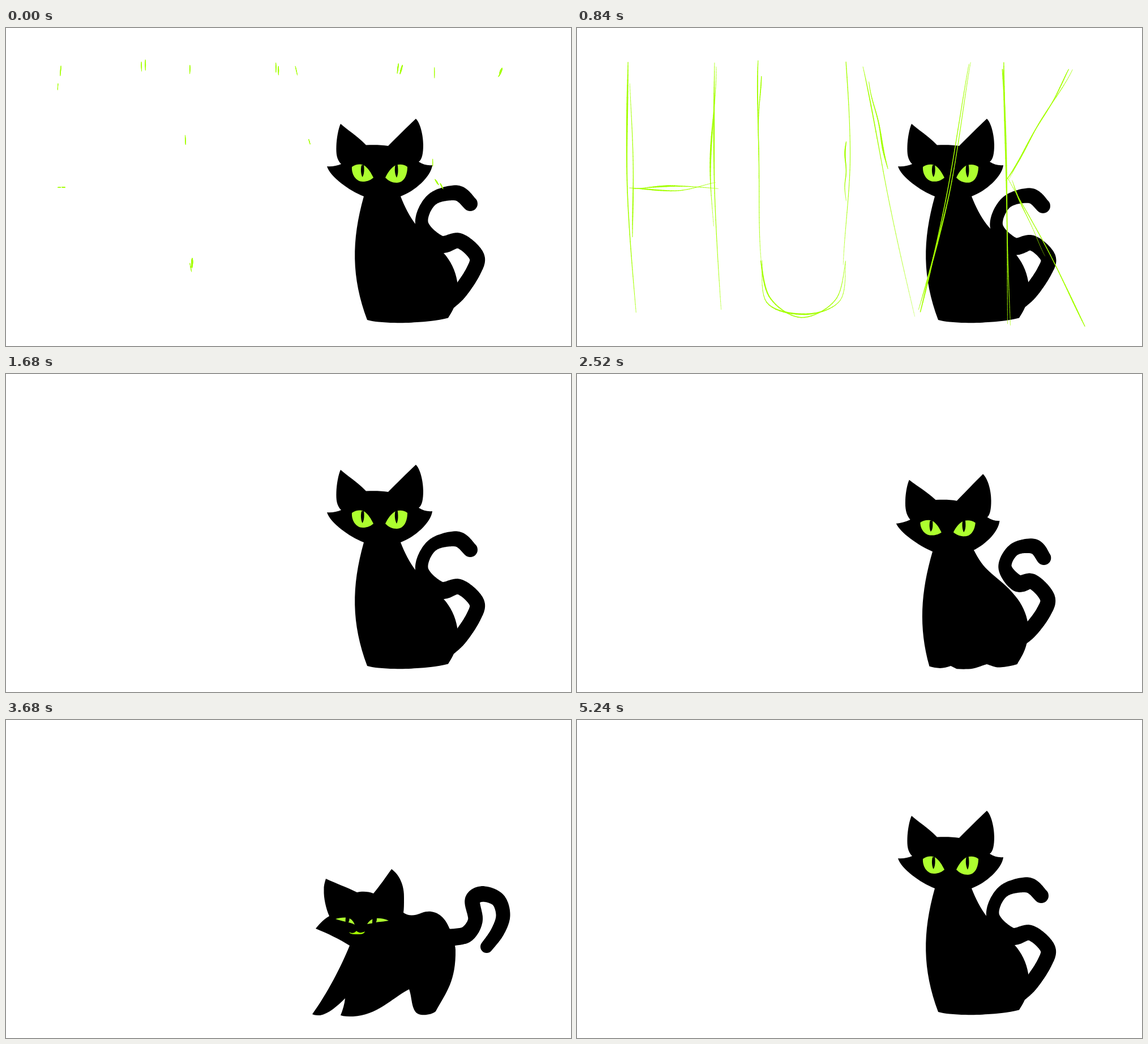
Recreate the animation shown at these times as an HTML page with a canvas. Size 998 by 561 pixels, loop 7.2 s.

```html
<!DOCTYPE html>
<html lang="en">
<head>
<meta charset="utf-8">
<title>Black cat</title>
<style>
  html, body { margin: 0; width: 100%; height: 100%; overflow: hidden; background: #fff; }
  canvas { display: block; width: 998px; height: 561px; }
</style>
</head>
<body>
<canvas id="stage" width="998" height="561"></canvas>
<script>
const ctx = document.getElementById('stage').getContext('2d');
const LOOP = 7200, TICK = 40;
const LIME = '#a4ff00', EYE = '#adff2f';

// Outlines: start point, then cubic segments. Poses share the segment order.
const heads = {
  sit: [567,244, 575,245,585,243,592,240, 584,232,583,222,583.5,208, 584,195,587,177,591,169,
    602,179,620,190,636,206.5, 648,206,664,206,675,208, 690,193,708,175,724,160,
    732,168,737,190,737,206, 737,221,735,232,729,236, 737,241,745,243,753,242,
    751,262,722,288,697,297, 680,300,650,300,632,297, 606,287,572,262,567,244],
  stand: [547,368, 554,359,562,351,571,346, 565,332,561,314,561.5,300, 561,293,563,286,565,280,
    582,288,602,295,620,304, 628,302,640,302,649,306, 660,293,671,277,681,263,
    695,273,704,292,703,315, 703,325,703,333,702,340, 706,344,709,346,712,348,
    712,370,700,390,680,400, 655,402,630,402,607,398, 590,387,567,376,547,368],
  stretch: [503,390, 511,394,519,397,527,400, 529,386,534,374,540,364, 548,350,556,338,565,333,
    571,344,576,356,579,367, 588,365,598,366,606,369.5, 622,357,640,342,658,333,
    660,335,661,337,662,339, 664,347,665,356,665,365, 665,374,665,382,665,390,
    660,420,640,448,612,462, 590,468,560,466,538,458, 518,446,503,422,503,390]
};
const bodies = {
  sit: [632,297, 610,375,610,440,638,515, 645,517,651,518,658,518.5, 663,519,667,519,672,519.5,
    677,520,681,520,686,520, 693,520.3,699,520.3,706,520, 713,520,719,519.5,726,519,
    734,518.5,742,518,750,517, 761,516,771,514,781,511.5, 790,497,800,482,797,447,
    794,428,785,410,773,397, 757,378,740,367,724,347, 713,333,704,315,697,297,
    680,292,650,292,632,297],
  stand: [607,398, 592,435,567,483,541,519, 545,521,550,521,555,521, 570,518,585,505,599,491,
    598,501,595,511,591,521, 597,523,605,523,613,523, 655,521,680,492,712,475,
    718,490,715,518,733,520, 743,521,753,519,759,514, 778,480,795,460,794,405,
    793,393,789,380,783,367, 772,340,752,334,735,340, 720,346,712,346,702,340,
    670,350,630,370,607,398],
  stretch: [538,458, 505,478,470,500,442,513, 452,528,480,525,500,516, 535,500,565,492,593,480,
    583,496,573,510,561,526, 572,534,590,532,601,522, 645,490,680,466,735,441,
    739,465,738,495,734,520, 745,521,757,517,765,508, 783,475,800,445,799,395,
    799,365,793,341,781,324, 770,308,758,305,741,305, 705,306,682,319,662,339,
    640,400,580,440,538,458]
};
// Tail spine: x, y, radius
const tails = {
  sit: [[772,492,13],[800,467,13.5],[826,428,13.3],[831,402,13.5],[801,375.5,13.5],
    [766,381,15],[734.5,345,11.5],[752,303,11],[796,291,13.5],[820,310,13]],
  side: [[775,458,13],[798,455,13],[822,452,14.5],[848,464,14.5],[876,480,14.5],
    [903,481,12.5],[922,470,10.5],[930,446,8.5],[924,430,8],[911,424,8]],
  stand: [[770,384,15],[793,383,15],[815,377,14.5],[829,353,13],[824,318,13.5],
    [842,307,13.8],[869,317,13],[878,345,12.5],[868,374,12],[849,400,11]],
  stretch: [[776,360,15],[789,340,17],[806,318,14],[830,312.5,13.5],[856,323,13.5],
    [863,347,12.5],[846,387,13.5],[825,425,13],[818,458,13],[837,473,11.5]]
};
const mirror = list => list.map((v, i) => i % 2 ? v : 1320 - v);
const shutEye = [613,274, 619,279,627,281,633,281, 639,281,644,280,649,278,
  643,283,637,285,631,285, 622,285,616,280,613,274];
const shutPupil = [631,283, 631,283,631,283,631,283, 631,283,631,283,631,283];
const eyes = {
  open: [
    [611,245, 618,240,626,239.5,632,242, 640,247,645,256,649,264, 642,270,636,271,630,271, 618,271,610,258,611,245],
    [709,245, 703,240,695,240,688,242, 680,247,674,255,670,264, 676,270,682,273,690,273, 704,273,709,258,709,245]],
  narrow: [
    [611,245, 619,244,627,246,633,250, 640,254,645,258,648,263, 643,268,637,268,632,267, 622,265,613,255,611,245],
    [709,245, 700,244,692,246,686,249, 678,254,674,258,671,264, 677,269,684,270,689,269, 700,266,707,256,709,245]],
  stand: [
    [582,351, 588,349,597,348,604,349, 611,351,614,356,616,361, 610,358,605,357,600,356, 593,354,587,353,582,351],
    [676,354, 668,350,660,349.5,653,350, 645,351,641,355,638,360, 644,359,650,358,656,356.5, 663,356,670,355,676,354]],
  stretch: [
    [538,397, 546,395,552,396,557,398, 562,400,566,403,569,406.5, 564,405,560,404,555,403, 549,402,543,400,538,397],
    [631,406, 624,402,618,402,613,402, 606,402,600,405,596,407.5, 602,407,608,407,614,407, 620,407,626,407,631,406]],
  shut: [shutEye, mirror(shutEye)]
};
const pupils = {
  open: [
    [628,242, 626,250,627,258,629.5,263, 633,258,633,249,632,241],
    [687.5,242, 686,251,687,258,690,264, 693,258,693,249,691.5,240]],
  narrow: [
    [627,247, 625,253,627,259,631,263, 635,259,635,254,634,249],
    [685,248, 684,253,686,259,689,263, 692,259,693,253,692.5,246]],
  stand: [
    [600,347, 600,351,599,354,600,359, 608,358,606,352,607,347],
    [648,347, 647,352,647,356,647,360, 655,360,655,354,655,347]],
  stretch: [
    [557,398, 557,398,557,398,557,398, 557,398,557,398,557,398],
    [613,402, 613,402,613,402,613,402, 613,402,613,402,613,402]],
  shut: [shutPupil, mirror(shutPupil)]
};
const yawn = [553,412, 537,422,537,455,557,462, 572,466,592,466,608,461, 623,446,622,424,600,417,
  599,421,597,427,595,433, 593,434,592,431,590,425, 584,426,577,426,572,419,
  567,422,562,422,558,421, 558,424,557,428,555,429, 552,424,552,418,553,412];
const smile = [606,374, 611,377,616,376,619,372, 623,376,628,376,634,373,
  632,378,627,378,620,378, 613,378,608,378,606,374];

const pose = (shape, tail, look) => [heads[shape], bodies[shape], tails[tail], eyes[look], pupils[look]];
const sit = pose('sit', 'sit', 'open');
const glare = pose('sit', 'side', 'narrow');
const stand = pose('stand', 'stand', 'stand');
const stretch = pose('stretch', 'stretch', 'stretch');
const blink = pose('sit', 'sit', 'shut');

const smooth = u => u * u * (3 - 2 * u);
const easeIn = u => u * u;
const easeOut = u => 1 - (1 - u) * (1 - u);
const clamp = u => Math.max(0, Math.min(1, u));

// time, pose, easing towards that pose
const keys = [
  [0, sit], [800, sit], [1160, glare, smooth], [1200, glare], [1560, sit, smooth],
  [2440, sit], [2640, stand, easeIn], [2880, stretch, easeOut], [3560, stretch],
  [3680, stand, easeIn], [4000, sit, easeOut],
  [4960, sit], [5080, blink, smooth], [5120, blink], [5240, sit, smooth], [LOOP, sit]
];

function mix(a, b, u) {
  return Array.isArray(a) ? a.map((v, i) => mix(v, b[i], u)) : a + (b - a) * u;
}

function poseAt(t) {
  const i = keys.findIndex(k => k[0] > t);
  const [t0, from] = keys[i - 1], [t1, to, ease] = keys[i];
  return from === to ? from : mix(from, to, ease((t - t0) / (t1 - t0)));
}

function fillShape(p, color) {
  ctx.fillStyle = color;
  ctx.beginPath();
  ctx.moveTo(p[0], p[1]);
  for (let i = 2; i < p.length; i += 6) ctx.bezierCurveTo(...p.slice(i, i + 6));
  ctx.closePath();
  ctx.fill();
}

// Point on a smooth curve through pts, u from 0 to 1
function along(pts, u) {
  const n = pts.length - 1, i = Math.min(n - 1, Math.floor(u * n)), f = u * n - i;
  const at = j => pts[Math.max(0, Math.min(n, j))];
  const [a, b, c, d] = [at(i - 1), at(i), at(i + 1), at(i + 2)];
  return b.map((v, k) => v + f / 2 * (c[k] - a[k] +
    f * (2 * a[k] - 5 * v + 4 * c[k] - d[k] + f * (3 * (v - c[k]) + d[k] - a[k]))));
}

function drawTail(spine) {
  ctx.fillStyle = '#000';
  ctx.beginPath();
  for (let i = 0; i <= 200; i++) {
    const [x, y, r] = along(spine, i / 200);
    ctx.moveTo(x + r, y);
    ctx.arc(x, y, r, 0, 7);
  }
  ctx.fill();
}

function drawCat(t) {
  const [head, body, tail, eye, pupil] = poseAt(t);
  drawTail(tail);
  fillShape(body, '#000');
  fillShape(head, '#000');
  for (const side of [0, 1]) {
    fillShape(eye[side], EYE);
    fillShape(pupil[side], '#000');
  }
  const open = smooth(clamp((t - 2700) / 180)) * (1 - smooth(clamp((t - 3240) / 200)));
  if (open > 0) {
    ctx.save();
    ctx.translate(head[0] - 503 + 580, head[1] - 390 + 416);
    ctx.scale(0.6 + 0.4 * open, open);
    ctx.translate(-580, -416);
    fillShape(yawn, LIME);
    ctx.restore();
  }
  if (t >= 3640 && t < 3760) {
    ctx.save();
    ctx.translate(head[0] - 547, head[1] - 368);
    fillShape(smile, LIME);
    ctx.restore();
  }
}

// Four sketched capitals: H U V K
const strokes = [
  [[94,56],[95,280],[99,505]], [[242,56],[241,280],[251,505]], [[92,284],[170,283],[252,278]],
  [[322,60],[323,250],[327,420]], [[327,405],[340,480],[400,508],[460,480],[475,405]], [[479,60],[478,250],[475,420]],
  [[508,60],[550,275],[600,508]], [[699,60],[655,275],[598,508]],
  [[754,62],[759,300],[766,530]], [[876,70],[820,172],[757,272]], [[760,266],[826,390],[906,530]]
];

function randomFrom(seed) {
  let s = seed * 7919 + 17;
  return () => {
    s = (s + 0x6D2B79F5) | 0;
    let r = Math.imul(s ^ s >>> 15, 1 | s);
    r = r + Math.imul(r ^ r >>> 7, 61 | r) ^ r;
    return ((r ^ r >>> 14) >>> 0) / 4294967296;
  };
}

function drawPass(pts, rnd, whole, start, end) {
  const off = n => (rnd() - 0.5) * n;
  const shape = pts.map(([x, y]) => [x + off(11), y + off(11)]);
  const a = whole ? rnd() * 0.04 : rnd() * 0.55;
  const b = whole ? 1 - rnd() * 0.05 : Math.min(1, a + 0.25 + rnd() * 0.4);
  const phase = rnd() * 6, freq = 5 + rnd() * 6, weight = 1.6 + rnd() * 1.5, swell = rnd();
  const steps = 40;
  let last = null;
  for (let i = 0; i <= steps; i++) {
    const v = start + (end - start) * i / steps;
    const [x, y] = along(shape, a + (b - a) * v);
    const wob = Math.sin(phase + freq * v);
    const p = [x + wob * 1.3, y + wob * 0.6];
    if (last) {
      const thick = Math.exp(-30 * (v - swell) ** 2);
      ctx.lineWidth = weight * (0.55 + 0.75 * thick) * (0.45 + 0.55 * Math.sin(Math.PI * i / steps));
      ctx.beginPath();
      ctx.moveTo(...last);
      ctx.lineTo(...p);
      ctx.stroke();
    }
    last = p;
  }
}

function drawSketch(t) {
  if (t >= 1680) return;
  const boil = t < 40 ? 0 : 1 + Math.floor(t / 120);
  const rnd = randomFrom(boil + 3);
  const step = t < 40 ? 0 : Math.max(40, Math.floor(t / 120) * 120);
  const end = Math.min(1, 0.06 + step / 400);
  const start = t < 1600 ? 0 : t < 1640 ? 0.5 : 0.88;
  ctx.strokeStyle = LIME;
  ctx.lineCap = 'round';
  for (const pts of strokes) {
    drawPass(pts, rnd, true, start, end);
    drawPass(pts, rnd, rnd() < 0.5, start, end);
  }
}

function draw(now) {
  const t = Math.floor((now % LOOP) / TICK) * TICK;
  ctx.fillStyle = '#fff';
  ctx.fillRect(0, 0, 998, 561);
  drawCat(t);
  drawSketch(t);
}

let origin = null;
function tick(now) {
  if (origin === null) origin = now;
  draw(Math.max(0, now - origin));
  requestAnimationFrame(tick);
}
draw(0);
requestAnimationFrame(tick);
</script>
</body>
</html>
```
